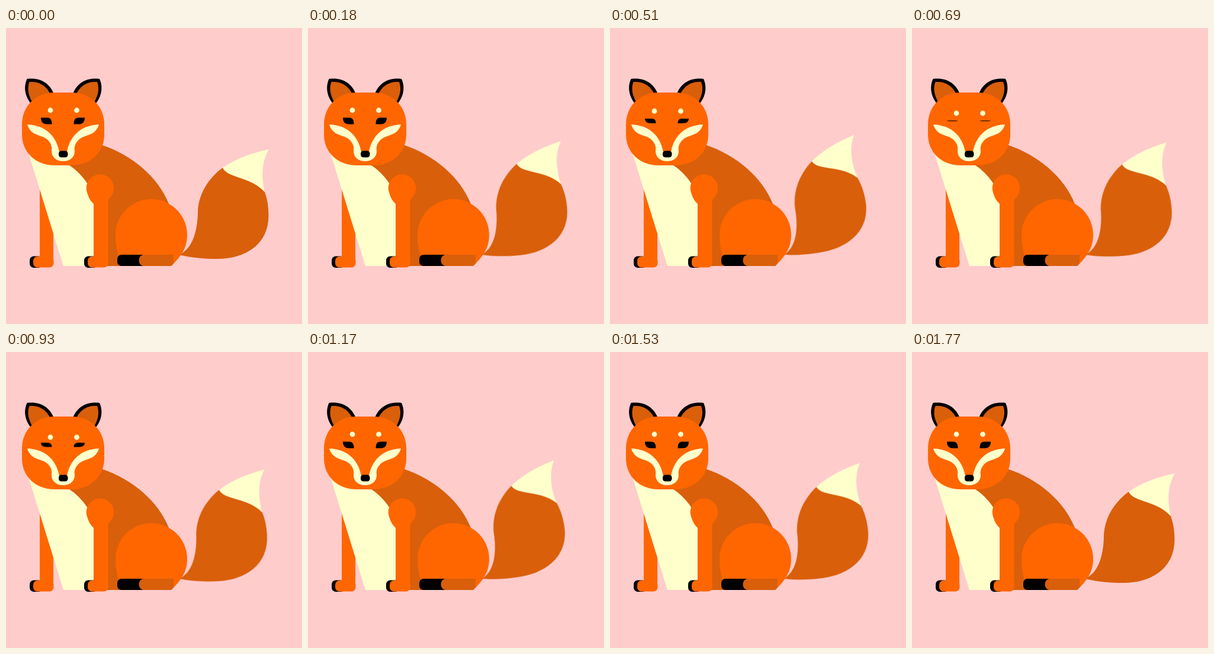
Recreate the animation shown at these times as an HTML page. Size 500 px wide and 500 px high, loop 1800 ms.

```html
<!DOCTYPE html>
<html lang="en">
<head>
<meta charset="utf-8">
<title>Fox</title>
<style>
  html, body { margin: 0; width: 100%; height: 100%; overflow: hidden; background: #fcc; }
  svg { display: block; width: 100vw; height: 100vh; }

  .orange { fill: #f60; }
  .rust { fill: #d95f0a; }
  .cream { fill: #ffc; }
  .black { fill: #000; }

  .tail, .lid, .brows { animation: 1800ms infinite; }
  .tail { transform-origin: 293px 371px; animation-name: wag; }
  .lid { transform-origin: 0 157px; animation-name: blink; }
  .brows { animation-name: frown; }

  /* 60 ticks of 30 ms; each stretch takes one step per tick */
  @keyframes wag {
    0% { transform: rotate(0deg); animation-timing-function: steps(14); }
    23.3333% { transform: rotate(-13deg); animation-timing-function: steps(14); }
    46.6667% { transform: rotate(0deg); animation-timing-function: steps(16); }
    73.3333% { transform: rotate(-13.4deg); animation-timing-function: steps(15); }
    98.3333%, 100% { transform: rotate(0deg); }
  }
  @keyframes blink {
    0%, 25% { transform: scaleY(1); animation-timing-function: steps(7); }
    36.6667% { transform: scaleY(.05); animation-timing-function: steps(15); }
    61.6667%, 100% { transform: scaleY(1); }
  }
  @keyframes frown {
    0%, 25% { transform: translateY(0); animation-timing-function: steps(7); }
    36.6667% { transform: translateY(5px); }
    51.6667% { transform: translateY(5px); animation-timing-function: steps(8); }
    65%, 100% { transform: translateY(0); }
  }
</style>
</head>
<body>
<svg viewBox="0 0 500 500">
  <defs>
    <g id="ear">
      <path class="black" d="M35.500 86C53 84 72 89 81 112L44 130C32 117 29 100 35.500 86Z"/>
      <path class="rust" d="M39.500 91C53 90 67 95 75 112L46 128C38 115 35 103 39.500 91Z"/>
    </g>
    <path id="eye" class="black" d="M59 151.500H70C75 151.500 77.500 155 77.500 162.500H69C62 162.500 59 158 59 151.500Z"/>
    <g id="paw">
      <rect class="black" x="40" y="385.500" width="22" height="19.500" rx="7"/>
      <rect class="orange" x="46" y="386" width="34.500" height="18.500" rx="7"/>
    </g>
  </defs>

  <g class="tail">
    <path class="rust" d="M288 382L296 381C316 370 323 342 324 314C324 284 339 256 366 236L400 235L437 277C442 291 443.500 303 443.500 317C443.500 365 405 390 357 390C335 390 314 388 297 384Z"/>
    <path class="cream" d="M366 236C390 220 415 211 444 205C432 225 431 250 437 277C412 250 374 254 366 236Z"/>
  </g>

  <path class="orange" d="M57 265H80V398H57Z"/>
  <use href="#paw"/>

  <path class="rust" d="M100 220L160 197C213 214 257 252 275 297V402H97Z"/>
  <path class="cream" d="M36 205L97 402H150V285L137 262C128 249 118 239 107 232L100 200Z"/>

  <path class="orange" d="M185 349.500A60.500 60.500 0 0 1 306 349.500C306 367 300 382 279 402H197C189 386 185 368 185 349.500Z"/>
  <rect class="black" x="188" y="383" width="50" height="19" rx="7"/>
  <path class="rust" d="M232 383H283V398L279 402H232C222 400 222 385 232 383Z"/>

  <circle class="orange" cx="159" cy="270.500" r="23.300"/>
  <path class="orange" d="M138 281Q141 291 148 297V398H172.500V291L180 280Z"/>
  <use href="#paw" x="92"/>

  <use href="#ear"/>
  <use href="#ear" transform="translate(193.500) scale(-1 1)"/>
  <path class="orange" d="M82 109H110C143 109 166 132 166 163V180C166 210 143 232 110 232H82C50 232 27 210 27 180V163C27 132 50 109 82 109Z"/>
  <path class="cream" d="M36 163C40 177 51 180 60 183C72 187 79 197 77 208C77 219 86 225 96.500 225C107 225 116 219 116 208C114 197 121 187 133 183C142 180 153 177 157 163C131 164 109 178 103 209H90C84 178 62 164 36 163Z"/>
  <rect class="black" x="89" y="207.500" width="15.500" height="11" rx="4.500"/>

  <g class="brows">
    <circle class="cream" cx="75" cy="139" r="4.400"/>
    <circle class="cream" cx="119.500" cy="139" r="4.400"/>
  </g>
  <g class="lid">
    <use href="#eye"/>
    <use href="#eye" transform="translate(192) scale(-1 1)"/>
  </g>
</svg>
</body>
</html>
```
